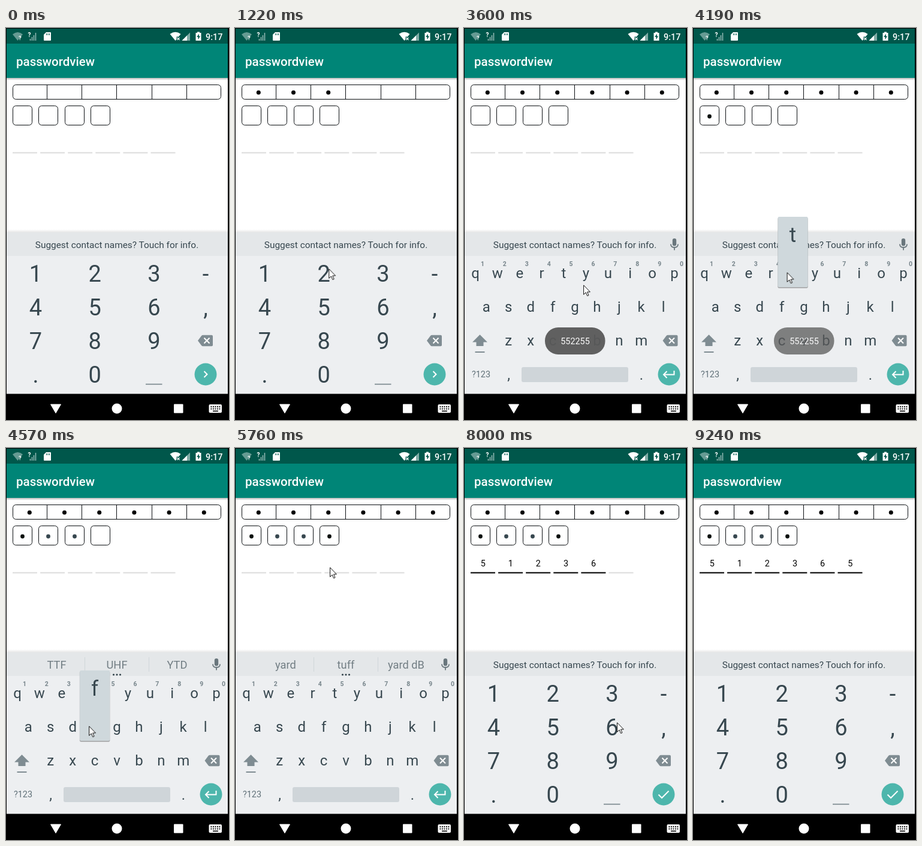
Recreate the animation shown at these times as an HTML page. Size 372 by 652 pixels, loop 9.64 s.

```html
<!DOCTYPE html>
<html lang="en">
<head>
<meta charset="utf-8">
<title>passwordview</title>
<style>
  html, body { margin: 0; width: 100%; height: 100%; overflow: hidden; background: #000; }
  svg { display: block; width: 372px; height: 652px; font-family: Roboto, sans-serif; }
  .mid text, text.mid { text-anchor: middle; }
  .keys { fill: #37474f; }
  .num { font-size: 38px; }
  .abc { font-size: 24px; }
  .hint { font-size: 10.5px; font-weight: 700; fill: #78868c; }
  .words { font-size: 18.3px; fill: #727e84; }
  .icon { fill: #7f8c92; }
  .line { fill: none; stroke: #fff; stroke-width: 2; }
  .edge { fill: none; stroke: #0b0f12; }
  #toast { animation: toast 9640ms linear infinite; }
  @keyframes toast {
    0%, 22.2% { opacity: 0; }
    23.8% { opacity: .8; }
    24.8%, 42.6% { opacity: .95; }
    46.7%, 100% { opacity: 0; }
  }
</style>
</head>
<body>
<svg viewBox="0 0 372 652" xmlns="http://www.w3.org/2000/svg">
  <defs>
    <linearGradient id="drop" x2="0" y2="1">
      <stop offset="0" stop-color="#000" stop-opacity=".28"/>
      <stop offset="1" stop-color="#000" stop-opacity="0"/>
    </linearGradient>
    <linearGradient id="rise" x2="0" y2="1">
      <stop offset="0" stop-color="#000" stop-opacity="0"/>
      <stop offset="1" stop-color="#000" stop-opacity=".1"/>
    </linearGradient>
    <g id="back">
      <path class="icon" d="M-13 0L-7 -8Q-6 -9.300 -4.500 -9.300H10Q12 -9.300 12 -7.300V7.300Q12 9.300 10 9.300H-4.500Q-6 9.300 -7 8Z"/>
      <path class="line" d="M-2.500 -4.500L6.500 4.500M6.500 -4.500L-2.500 4.500"/>
    </g>
  </defs>

  <rect width="372" height="652"/>
  <rect x="1" y="83" width="369" height="257" fill="#fff"/>
  <rect x="1" y="1" width="369" height="25" fill="#00574b"/>
  <rect x="1" y="26" width="369" height="57" fill="#008577"/>
  <rect x="1" y="83" width="369" height="4" fill="url(#drop)"/>

  <!-- status bar -->
  <g fill="#fff">
    <path d="M11 10.500Q19.500 3.500 28 10.500L19.500 21Z" opacity=".4"/>
    <path d="M40.500 21V18M43.500 21V15M46.500 21V12M49.500 21V8" stroke="#fff" stroke-width="1.500" opacity=".6"/>
    <text x="21" y="20" font-size="9.500" font-weight="700">?</text>
    <text x="36.500" y="15" font-size="10" font-weight="700">?</text>
    <path d="M67 7H74Q75 7 75 8V20Q75 21 74 21H64Q63 21 63 20V11Z"/>
    <path d="M67.500 9v3M70 9v3M72.500 9v3" stroke="#00574b"/>
    <path d="M273.500 10Q282.500 3.500 291.500 10L288 14.500H284.500V19L282.500 21Z"/>
    <path d="M285.500 16l4 4M289.500 16l-4 4" stroke="#fff" stroke-width="1.300"/>
    <path d="M293.500 21H307V7.500Z" opacity=".5"/>
    <path d="M293.500 21H302V12.500Z"/>
    <path d="M319 6.500H323V8H325.500V21H316.500V8H319Z"/>
    <path d="M321.800 9.500L318.300 15H320.500V19.500L324 13.500H321.800Z" fill="#00574b"/>
    <text x="333" y="20" font-size="14.400" font-weight="500">9:17</text>
    <text x="17" y="63" font-size="20.500" font-weight="500">passwordview</text>
  </g>

  <g id="fields" class="mid">
    <rect class="edge" x="11.500" y="94.500" width="347" height="24" rx="5"/>
  </g>

  <!-- keyboard -->
  <rect x="1" y="335" width="369" height="5" fill="url(#rise)"/>
  <rect x="1" y="340" width="369" height="268.500" fill="#edeff1"/>
  <rect x="1" y="340" width="369" height="39" fill="#e4e7e9"/>
  <text id="prompt" class="mid" x="185" y="366" font-size="15.400" fill="#37474f">Suggest contact names? Touch for info.</text>
  <g id="words" class="words mid">
    <path d="M131.500 348V372M238.500 348V372" stroke="#d0d6d9"/>
    <path d="M179.500 377h.01M185 377h.01M190.500 377h.01" stroke="#37474f" stroke-width="3.200" stroke-linecap="round"/>
  </g>

  <g id="numpad" class="keys num mid">
    <g id="presses" fill="#cfd8dc"></g>
    <path d="M233 592.500H260.500" stroke="#75838a" stroke-width="1.600"/>
    <use href="#back" x="333" y="520"/>
    <circle cx="333" cy="576" r="18.500" fill="#4db6ac"/>
    <path id="next" class="line" d="M330.500 571L335.500 576L330.500 581"/>
    <path id="done" class="line" d="M324.500 576.500L330 582L341.500 570.500"/>
  </g>

  <g id="letters" class="keys abc mid">
    <rect x="347.800" y="350" width="6.400" height="12.500" rx="3.200" fill="#69767c"/>
    <path d="M345 359.500Q345 365 351 365Q357 365 357 359.500M351 365V369.500" fill="none" stroke="#69767c" stroke-width="1.800"/>
    <path class="icon" d="M26.500 510L39 522.500H32.500V529H20.500V522.500H14Z"/>
    <path d="M18.500 539H34.500" stroke="#7f8c92" stroke-width="2"/>
    <use href="#back" x="344.500" y="520"/>
    <rect x="96" y="564" width="178" height="25" rx="3" fill="#cfd5d9"/>
    <text x="28.500" y="581" font-size="14.400" fill="#607078">?123</text>
    <text x="74.500" y="585">,</text>
    <text x="296" y="585">.</text>
    <circle cx="342" cy="576" r="18.500" fill="#4db6ac"/>
    <path class="line" d="M350.500 570V576.500H333.500M338.500 571L333 576.500L338.500 582"/>
  </g>

  <g id="popups" class="keys mid" font-size="35"></g>

  <!-- navigation bar -->
  <g fill="#fff">
    <path d="M74.500 626H91.500L83 640.500Z" stroke="#fff" stroke-linejoin="round"/>
    <circle cx="185" cy="633" r="8.500"/>
    <rect x="280" y="625.500" width="15.500" height="15" rx="1"/>
    <rect x="338.500" y="626" width="21.500" height="14" rx="2"/>
    <path d="M341.500 630H357.500M341.500 633.500H357.500" stroke="#000" stroke-width="1.800" stroke-dasharray="1.800 1.700"/>
    <path d="M345 637.200H354" stroke="#000" stroke-width="1.600"/>
  </g>

  <g id="toast">
    <rect x="135" y="498" width="100.500" height="45" rx="22" fill="#595959"/>
    <text class="mid" x="185.500" y="526" font-size="14.400" fill="#fff">552255</text>
  </g>

  <g id="cursor">
    <path d="M.6 .8V16.300L4.200 12.900L6.700 18.600L9 17.600L6.600 12H11.400Z" fill="#fff" stroke="#111" stroke-linejoin="round"/>
  </g>
</svg>

<script>
const LOOP = 9640, TICK = 76.6, HOLD = 150, LEAD = 200, LINGER = 80;
const TO_LETTERS = 3220, TO_NUMBERS = 6010, HINTS = 4260, NEW_HINTS = 5070;
const $ = id => document.getElementById(id);

function add(parent, tag, attrs, text = '') {
  const el = document.createElementNS('http://www.w3.org/2000/svg', tag);
  for (const k in attrs) el.setAttribute(k, attrs[k]);
  el.textContent = text;
  parent.appendChild(el);
  return el;
}
const play = (el, frames) => el.animate(frames, { duration: LOOP, iterations: Infinity });

// Visible only within the given [from, to] spans.
function show(el, ...spans) {
  const key = (t, opacity) => ({ offset: t / LOOP, opacity, easing: 'steps(1, end)' });
  const frames = spans.flatMap(([a, b]) => [key(a, 1), key(b, 0)]);
  if (spans[0][0] > 0) frames.unshift(key(0, 0));
  if (spans.at(-1)[1] < LOOP) frames.push(key(LOOP, 0));
  play(el, frames);
}

// Each entry: the key and the moment its character lands.
const typed = (text, times) => [...text].map((c, i) => ({ c, t: times[i] }));
const pin = typed('552255', [760, 920, 1150, 1380, 1990, 2140]);
const word = typed('ytfg', [4110, 4340, 4570, NEW_HINTS]);
const code = typed('512365', [6470, 6870, 7400, 7640, 8000, 8230]);

// Key layouts
const spots = {};
['123-', '456,', '789', '.0'].forEach((row, r) => [...row].forEach((c, i) => {
  const x = i < 3 ? 49.5 + 98.7 * i : 333, y = 408 + 56 * r;
  spots[c] = [x, y];
  add($('numpad'), 'text', { x, y: y + 13.5 }, c);
}));
['qwertyuiop', 'asdfghjkl', 'zxcvbnm'].forEach((row, r) => [...row].forEach((c, i) => {
  const x = 185 + 36.9 * (i - (row.length - 1) / 2), y = 408 + 56 * r;
  spots[c] = [x, y];
  add($('letters'), 'text', { x, y: y + 8 }, c);
  if (!r) add($('letters'), 'text', { x: x + 12, y: y - 12, class: 'hint' }, (i + 1) % 10);
}));

// Key feedback
for (const { c, t } of [...pin, ...code]) {
  const [x, y] = spots[c];
  show(add($('presses'), 'rect', { x: x - 46, y: y - 24.5, width: 92, height: 46, rx: 2 }), [t - HOLD, t]);
}
for (const { c, t } of word) {
  const [x, y] = spots[c], g = add($('popups'), 'g', {});
  const card = { x: x - 25, y: y - 94, width: 50, height: 117, rx: 2 };
  add(g, 'rect', { ...card, y: y - 92.5, opacity: .3, fill: '#000', stroke: '#000', 'stroke-opacity': .4 });
  add(g, 'rect', { ...card, fill: '#cfd8dc' });
  add(g, 'text', { x, y: y - 52 }, c);
  show(g, [t - LEAD, t + LINGER]);
}

// Password fields
const fields = $('fields');
pin.forEach(({ t }, i) => {
  if (i) add(fields, 'path', { d: `M${Math.floor(10.3 + 58.2 * i) + .5} 94.5v24`, class: 'edge' });
  show(add(fields, 'circle', { cx: 39.3 + 58.2 * i, cy: 107.3, r: 3.5 }), [t, LOOP]);
});
word.forEach(({ t }, i) => {
  const x = 11.5 + Math.floor(43.5 * i);
  add(fields, 'rect', { x, y: 129.5, width: 32, height: 32, rx: 5, class: 'edge' });
  const fill = i % 3 ? '#37474f' : '#0b100e';
  show(add(fields, 'circle', { cx: x + 16, cy: 147, r: 3.4, fill }), [t, LOOP]);
});
code.forEach(({ c, t }, i) => {
  const x = 11 + 46.1 * i, bar = { d: `M${x} 207.5h41`, 'stroke-width': 2 };
  add(fields, 'path', { ...bar, stroke: '#dcdcdc' });
  const g = add(fields, 'g', {});
  add(g, 'path', { ...bar, stroke: '#000' });
  add(g, 'text', { x: x + 20.7, y: 197, 'font-size': 14.4 }, c);
  show(g, [t, LOOP]);
});

// Suggestions and layout switches
function suggest(list, from, to) {
  list.forEach((text, i) => show(add($('words'), 'text', { x: 84.5 + 100.5 * i, y: 367 }, text), [from, to]));
}
suggest(['TTF', 'UHF', 'YTD'], HINTS, NEW_HINTS);
suggest(['yard', 'tuff', 'yard dB'], NEW_HINTS, TO_NUMBERS);
show($('words'), [HINTS, TO_NUMBERS]);
show($('prompt'), [0, HINTS], [TO_NUMBERS, LOOP]);
show($('numpad'), [0, TO_LETTERS], [TO_NUMBERS, LOOP]);
show($('letters'), [TO_LETTERS, TO_NUMBERS]);
show($('next'), [0, TO_LETTERS]);
show($('done'), [TO_NUMBERS, LOOP]);

// The pointer rests on each key while it is held and travels in ticks between stops.
const stay = (from, to, x, y) => [[from, x, y], [to, x, y]];
const onPad = c => [spots[c][0] + 8, spots[c][1] - 8];
const onKey = c => [spots[c][0] - 10, spots[c][1] - 2];
const path = [
  ...[...pin, ...code].flatMap(({ c, t }) => stay(t - HOLD, t, ...onPad(c))),
  ...word.flatMap(({ c, t }) => stay(t - LEAD, t, ...onKey(c))),
  ...stay(0, 70, 246, 609),
  [460, ...onPad('5')],
  [1540, ...onPad('5')],
  [2300, 219, 430],
  [2760, 129, 189],
  ...stay(2990, 3140, 120, 158),
  ...stay(3600, 3830, 199, 427),
  [5150, ...onKey('g')],
  [5530, 158, 206],
  ...stay(5760, 5930, 158, 198),
  [7020, ...onPad('1')],
  [7100, 105, 422],
  [8400, ...onPad('5')],
  ...stay(9160, LOOP, 342, 612)
].sort((a, b) => a[0] - b[0]);

play($('cursor'), path.map(([t, x, y], i) => {
  const end = path[i + 1]?.[0] ?? LOOP;
  const n = Math.max(1, Math.round((end - t) / TICK));
  return { offset: t / LOOP, transform: `translate(${x}px, ${y}px)`, easing: `steps(${n}, end)` };
}));
show($('cursor').firstElementChild, [70, 9240]);
</script>
</body>
</html>
```
